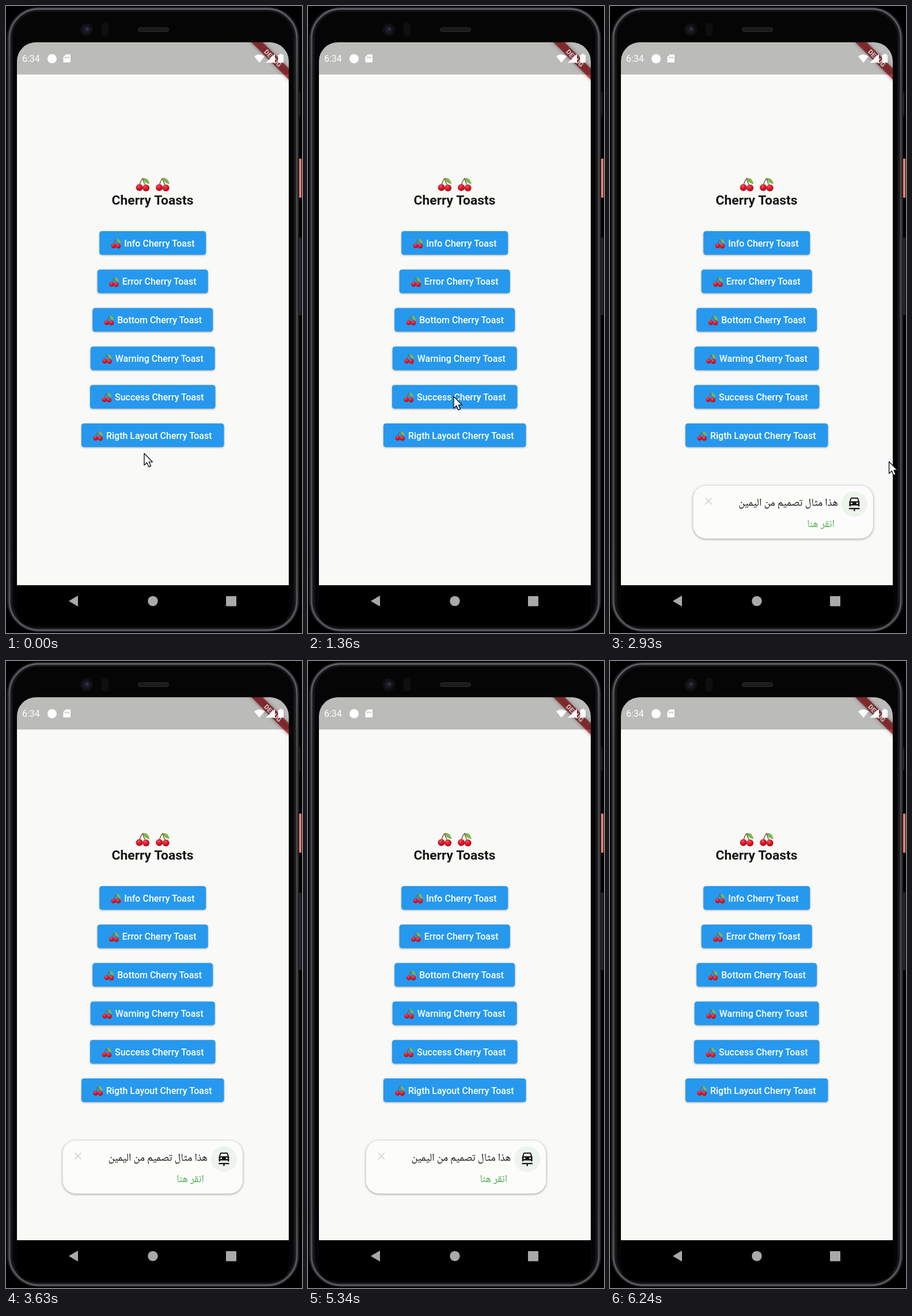
These frames come from a looping animation (514 by 1089 pixels, 6280 ms). An HTML page:

```html
<!DOCTYPE html>
<html lang="en">
<head>
<meta charset="utf-8">
<title>Cherry Toasts</title>
<style>
  html, body { margin: 0; width: 100%; height: 100%; overflow: hidden; background: #000; }
  svg { display: block; width: 514px; height: 1089px; font-family: Roboto, sans-serif; }
  .button { fill: #2699ee; filter: drop-shadow(0 1.5px 1.5px rgba(0,0,0,.35)); }
  .label { font-size: 16px; font-weight: 500; fill: #fff; }
  .arabic { font-family: "Noto Naskh Arabic", "Noto Sans Arabic", "DejaVu Sans", sans-serif; font-size: 18.5px; text-anchor: end; }
  .card { fill: #fcfcfb; filter: drop-shadow(0 1px 2px rgba(0,0,0,.4)); }
  .banner { fill: rgba(172,28,36,.8); filter: drop-shadow(0 0 3px rgba(0,0,0,.5)); }
</style>
</head>
<body>
<svg viewBox="0 0 514 1089">
  <defs>
    <clipPath id="screen"><path d="M19 1006V96A33 33 0 0 1 52 63H458A33 33 0 0 1 491 96V1006Z"/></clipPath>
    <clipPath id="lastButton"><rect x="131" y="725" width="247.500" height="41" rx="4.500"/></clipPath>
    <radialGradient id="red" cx=".4" cy=".3" r=".75">
      <stop offset="0" stop-color="#f2575d"/>
      <stop offset=".45" stop-color="#d91a2c"/>
      <stop offset="1" stop-color="#a30d20"/>
    </radialGradient>
    <linearGradient id="rim" x2="0" y2="1">
      <stop offset="0" stop-color="#5e5f64"/>
      <stop offset=".12" stop-color="#47484c"/>
      <stop offset=".85" stop-color="#47484c"/>
      <stop offset="1" stop-color="#5a5b60"/>
    </linearGradient>
    <symbol id="cherry" viewBox="0 0 25 25">
      <path d="M12.500 2Q21 0 24 12Q14 11 12.500 2Z" fill="#7cb84f"/>
      <path d="M12.500 2Q8 7 7 14M12.500 2Q13 9 17.500 15" fill="none" stroke="#7a6038" stroke-width="1.500"/>
      <circle cx="6.500" cy="18" r="5.900" fill="url(#red)"/>
      <circle cx="17.800" cy="18.700" r="5.900" fill="url(#red)"/>
    </symbol>
  </defs>

  <!-- phone body -->
  <rect x="509" y="265" width="4" height="68" rx="1" fill="#ea7d70"/>
  <rect x="509" y="150" width="2" height="40" fill="#222"/>
  <rect x="509" y="402" width="4" height="135" rx="1" fill="#242426"/>
  <rect x="2" y="2" width="507" height="1085" rx="54" fill="#202124"/>
  <rect x="6" y="5" width="499" height="1079" rx="51" fill="#1a1a1c" stroke="url(#rim)" stroke-width="3"/>
  <rect x="11" y="9" width="489" height="1071" rx="46" fill="#050506" stroke="#141416" stroke-width="2"/>
  <circle cx="140" cy="41" r="11" fill="#101014"/>
  <circle cx="140" cy="41" r="6.500" fill="#1b1b26"/>
  <circle cx="141" cy="40" r="2.500" fill="#343448"/>
  <rect x="166" y="29" width="12" height="24" rx="6" fill="#0f0f11"/>
  <rect x="229.500" y="37.500" width="53" height="7" rx="3.500" fill="#1b1b1b" stroke="#2c2c2c"/>
  <path d="M19 1006H491V1050Q491 1076 465 1076H45Q19 1076 19 1050Z"/>

  <g clip-path="url(#screen)">
    <rect x="19" y="63" width="472" height="943" fill="#f9f9f7"/>
    <use href="#cherry" x="225" y="297" width="25.500" height="25.500"/>
    <use href="#cherry" x="259.500" y="297" width="25.500" height="25.500"/>
    <text x="254.500" y="345" text-anchor="middle" font-size="22.900" font-weight="700" fill="#171717">Cherry Toasts</text>
    <g id="buttons"></g>
    <g id="toast">
      <rect class="card" x="98.500" y="833" width="312.500" height="92" rx="22.500"/>
      <circle cx="378.500" cy="865" r="22.500" fill="#edf4ec"/>
      <path transform="translate(364.700 851) scale(1.146)" fill="#161616" fill-rule="evenodd"
        d="M7.300 2.500H16.700Q17.500 2.500 17.800 3.300L19.800 9V15.300Q19.800 16 19.100 16H18.400Q17.700 16 17.700 15.300V14.500H6.300V15.300Q6.300 16 5.600 16H4.900Q4.200 16 4.200 15.300V9L6.200 3.300Q6.500 2.500 7.300 2.500ZM7.600 4.200L6.300 8H17.700L16.400 4.200ZM6.500 10V12.200H9V10ZM15 10V12.200H17.500V10ZM4 18H20V20H13V23H11V20H4Z"/>
      <path d="M119.500 854.500L130.500 865.500M130.500 854.500L119.500 865.500" stroke="#c9c9c9" stroke-width="1.300"/>
      <text class="arabic" x="350" y="868" fill="#161616">هذا مثال تصميم من اليمين</text>
      <text class="arabic" x="344" y="904.500" fill="#4caf50">انقر هنا</text>
    </g>
    <g transform="translate(491 63) rotate(45) scale(1.146)">
      <rect class="banner" x="-60" y="28" width="120" height="12"/>
      <text y="37.700" text-anchor="middle" font-size="10.200" font-weight="900" fill="#fff">DEBUG</text>
    </g>
    <rect x="19" y="63" width="472" height="56" fill="#000" fill-opacity=".25"/>
  </g>

  <!-- status icons -->
  <g fill="#fff">
    <text x="28" y="97" font-size="16">6:34</text>
    <circle cx="80" cy="91.500" r="8"/>
    <path fill-rule="evenodd" d="M104 84H111Q112 84 112 85V97Q112 98 111 98H100.500Q99.500 98 99.500 97V88.500ZM102.500 88V91H104V88ZM105.200 88V91H106.700V88ZM108 88V91H109.500V88Z"/>
    <path d="M431 87.500Q440 80.500 449 87.500L440 98.500ZM451 98.500L467 83.500V98.500ZM472.500 85H475V83.300H479.500V85H482V98.500H472.500Z"/>
  </g>
  <g fill="#a9a9a9">
    <path d="M109 1033.500L125 1024V1043Z"/>
    <circle cx="255" cy="1033.500" r="8.700"/>
    <rect x="382" y="1025" width="18" height="17.500" rx="1"/>
  </g>
  <path id="cursor" d="M0 0V20.500L4.700 16.300L8 23.500L11.500 22L8.300 14.900H14.500Z" fill="#fff" stroke="#161616" stroke-width="1.400" stroke-linejoin="round"/>
</svg>
<script>
const LOOP = 6280;
const $ = id => document.getElementById(id);
const clamp = u => Math.min(1, Math.max(0, u));
const mix = (a, b, u) => a + (b - a) * u;
const smooth = u => u * u * (3 - 2 * u);

// cubic-bezier(.25, .1, .25, 1)
function ease(x) {
  const curve = (a, b, s) => 3 * a * s * (1 - s) ** 2 + 3 * b * s * s * (1 - s) + s ** 3;
  let lo = 0, hi = 1;
  for (let i = 0; i < 24; i++) {
    const mid = (lo + hi) / 2;
    if (curve(.25, .25, mid) < x) lo = mid; else hi = mid;
  }
  return curve(.1, 1, hi);
}

const buttons = [["Info", 185], ["Error", 192], ["Bottom", 209], ["Warning", 216], ["Success", 217.5], ["Rigth Layout", 247.5]];
$("buttons").innerHTML = buttons.map(([name, w], i) => {
  const x = 254.75 - w / 2, y = 391 + i * 66.8;
  const ripple = i === 5 ? '<g clip-path="url(#lastButton)"><circle id="ripple" fill="#fff"/></g>' : "";
  return `<rect class="button" x="${x}" y="${y}" width="${w}" height="41" rx="4.500"/>${ripple}
    <use href="#cherry" x="${x + 20}" y="${y + 12.5}" width="18" height="18"/>
    <text class="label" x="${x + 43}" y="${y + 26.5}">${name} Cherry Toast</text>`;
}).join("");

// time, x, y of the pointer tip
const path = [[0, 240, 777], [1360, 253, 678], [2050, 271, 751], [2600, 271, 751], [3050, 530, 800]];

function drawCursor(t) {
  let i = 0;
  while (i < path.length - 2 && t > path[i + 1][0]) i++;
  const [t0, x0, y0] = path[i], [t1, x1, y1] = path[i + 1];
  const u = smooth(clamp((t - t0) / (t1 - t0)));
  $("cursor").setAttribute("transform", `translate(${mix(x0, x1, u)} ${mix(y0, y1, u)})`);
}

function drawRipple(t) {
  const u = ease(clamp((t - 2183) / 225));
  const ripple = $("ripple");
  ripple.setAttribute("cx", mix(271, 254.75, u));
  ripple.setAttribute("cy", mix(751, 745.5, u));
  ripple.setAttribute("r", mix(38, 125, u));
  ripple.setAttribute("fill-opacity", .25 * clamp((t - 2150) / 75) * clamp((2560 - t) / 150));
}

function drawToast(t) {
  const shown = clamp(Math.min(t - 2260, 6260 - t) / 1000);
  $("toast").setAttribute("transform", `translate(${625 * (1 - ease(shown))} 0)`);
}

let start;
function draw(now) {
  start ??= now;
  const t = (now - start) % LOOP;
  drawCursor(t);
  drawRipple(t);
  drawToast(t);
  requestAnimationFrame(draw);
}
requestAnimationFrame(draw);
</script>
</body>
</html>
```
